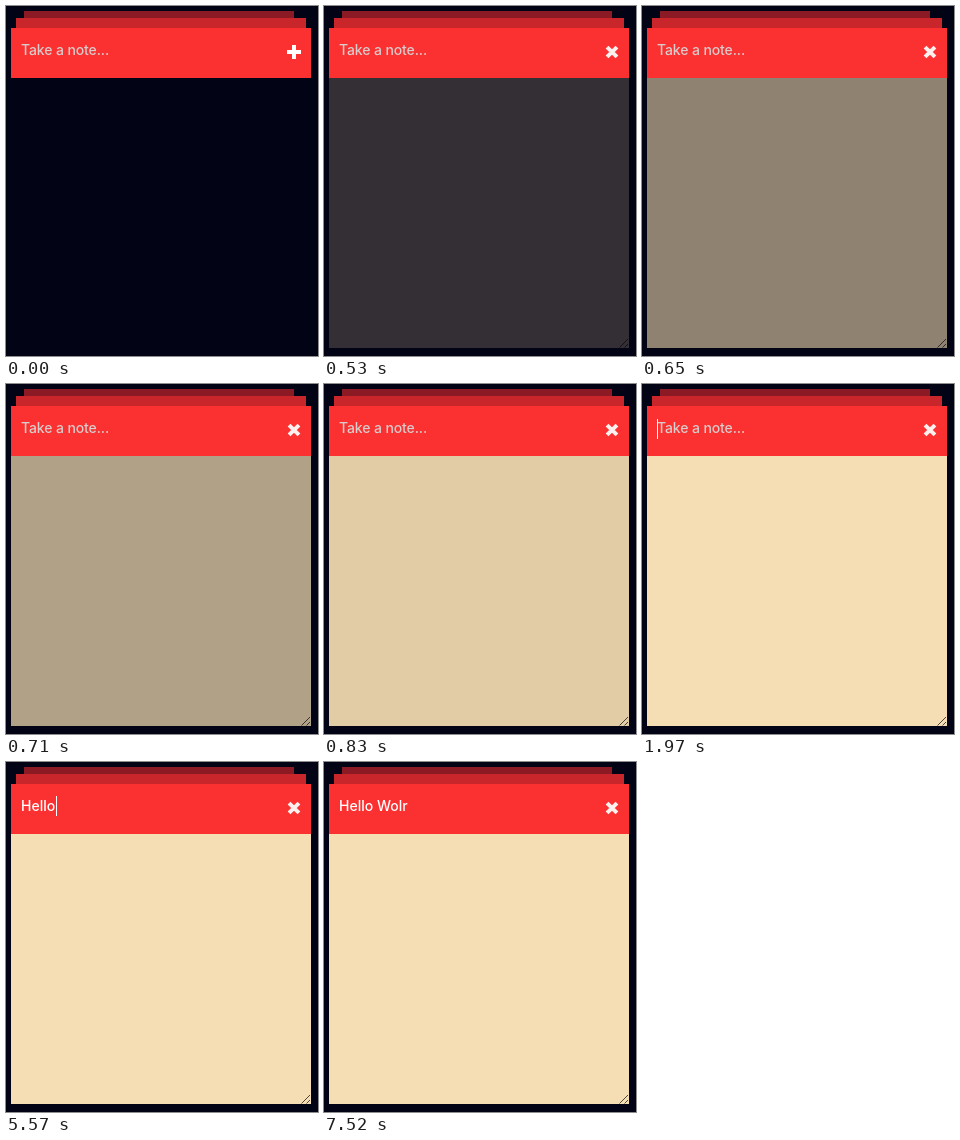
Write an HTML page that moves like this. It is 312 px wide and 350 px high and loops after 8000 ms.

```html
<!DOCTYPE html>
<html lang="en">
<head>
<meta charset="utf-8">
<title>Note</title>
<style>
  html, body { margin: 0; width: 100%; height: 100%; overflow: hidden; background: #020314; }
  svg { display: block; width: 312px; height: 350px; }
  text { font: 500 14px Inter, sans-serif; white-space: pre; }
  #hint { fill: #d8cccc; letter-spacing: -.12px; }
  #typed { fill: #fff; }
</style>
</head>
<body>
<svg viewBox="0 0 312 350">
  <rect x="18" y="5" width="270" height="7" fill="#8c1a25"/>
  <rect x="10" y="12" width="290" height="10" fill="#c8262b"/>
  <rect x="5" y="22" width="300" height="50" fill="#fb3030"/>
  <g id="note" opacity="0">
    <rect x="5" y="72" width="300" height="270" fill="#f5deb3"/>
    <path d="M295.5 341.5l8.5-8.5M300.5 341.5l3.5-3.5" stroke="#4c4640" fill="none"/>
  </g>
  <path id="icon" d="M281 46h14M288 39v14" stroke="#fff" stroke-width="4"/>
  <text id="hint" x="15" y="49">Take a note...</text>
  <text id="typed" x="15" y="49" xml:space="preserve"></text>
  <rect id="caret" width="1" height="20" fill="#fff"/>
</svg>
<script>
const LOOP = 8000, OPEN = 500, FADE_START = 478, FADE = 490;
const MESSAGE = 'Hello Wolr';
// when each letter is typed, and where the caret rests after it
const keyTimes = [3590, 3950, 4250, 4370, 4550, 5750, 6440, 6620, 6860, 7010];
const caretX = [15, 25, 33, 37, 41, 50, 53, 67, 76, 79, 85];
const blinks = [[1970, 2480], [2990, 3530], [3590, 5030], [5570, 6290], [6440, 7520]];

const [note, icon, hint, typed, caret] =
  ['note', 'icon', 'hint', 'typed', 'caret'].map(id => document.getElementById(id));

const easeOut = p => 1 - (1 - p) ** 2;
const clamp = v => Math.min(1, Math.max(0, v));
const show = (el, on) => el.setAttribute('visibility', on ? 'visible' : 'hidden');

function draw(t) {
  const open = t >= OPEN;
  note.setAttribute('opacity', open ? easeOut(clamp((t - FADE_START) / FADE)) : 0);
  icon.setAttribute('transform', `rotate(${open ? 45 : 0} 288 46)`);
  icon.setAttribute('stroke', open ? '#fdf0ee' : '#fff');

  const count = keyTimes.filter(k => t >= k).length;
  typed.textContent = MESSAGE.slice(0, count);
  show(hint, count === 0);

  caret.setAttribute('x', caretX[count]);
  caret.setAttribute('y', count ? 34 : 35);
  show(caret, blinks.some(([on, off]) => t >= on && t < off));
}

let start;
function tick(now) {
  start ??= now;
  draw((now - start) % LOOP);
  requestAnimationFrame(tick);
}
draw(0);
requestAnimationFrame(tick);
</script>
</body>
</html>
```
